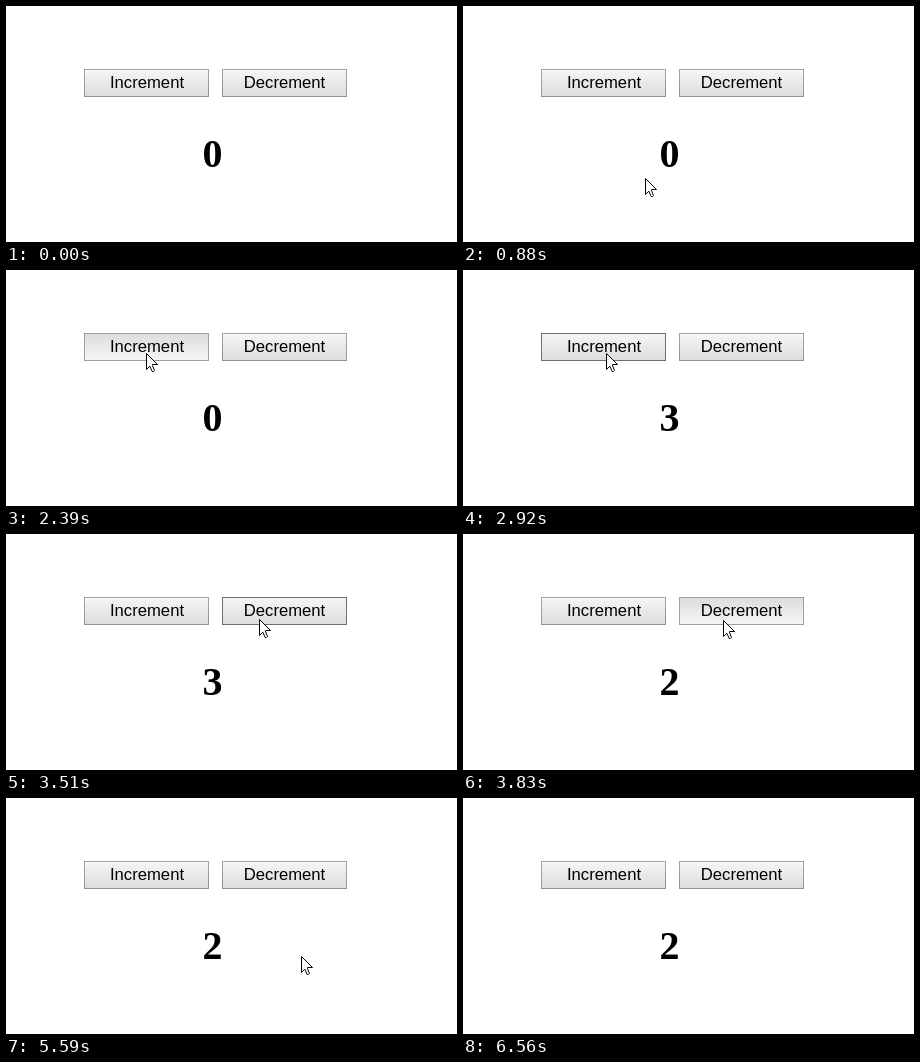
An HTML page for the animation above (6.86 s loop, 451 px wide and 236 px high).

```html
<!DOCTYPE html>
<html lang="en">
<head>
<meta charset="utf-8">
<title>Counter</title>
<style>
  html, body { margin: 0; width: 100%; height: 100%; overflow: hidden; background: #fff; }
  svg { display: block; }
  .button rect { fill: url(#raised); stroke: url(#edge); }
  .button.hover rect { stroke: #707070; }
  .button.pressed rect { fill: url(#sunken); stroke: #a0a0a0; }
  .button text { font: 16.667px "Liberation Sans", Arial, sans-serif; text-anchor: middle; }
  #count { font: bold 40px "Liberation Serif", "Times New Roman", serif; text-anchor: middle; }
</style>
</head>
<body>
<svg width="451" height="236" viewBox="0 0 451 236">
  <defs>
    <linearGradient id="raised" x2="0" y2="1">
      <stop stop-color="#f6f6f6"/><stop offset="1" stop-color="#dcdcdc"/>
    </linearGradient>
    <linearGradient id="sunken" x2="0" y2="1">
      <stop stop-color="#dcdcdc"/><stop offset="1" stop-color="#f6f6f6"/>
    </linearGradient>
    <linearGradient id="edge" x2="0" y2="1">
      <stop stop-color="#a4a4a4"/><stop offset="1" stop-color="#929292"/>
    </linearGradient>
  </defs>
  <g class="button" transform="translate(78 63)">
    <rect x=".5" y=".5" width="124" height="27"/>
    <text x="63" y="19">Increment</text>
  </g>
  <g class="button" transform="translate(216 63)">
    <rect x=".5" y=".5" width="124" height="27"/>
    <text x="62.5" y="19">Decrement</text>
  </g>
  <text id="count" x="206.5" y="161">0</text>
  <path id="cursor" d="M.5.5V16.5L3.8 13.2 6.2 18.5H7.5L8.5 17.5 6.5 12.5V11.5H11.5Z"
    fill="#fff" stroke="#000" stroke-linejoin="round"/>
</svg>
<script>
const LOOP = 6860;
const CLICK = 120; // one click; the button is down for its first half

// Key points of the pointer's route, joined by straight glides
const route = [
  { t: 330, x: 288, y: 240 },
  { t: 1040, x: 152, y: 152 },
  { t: 1630, x: 136, y: 95 },
  { t: 1960, x: 138, y: 83 },
  { t: 2920, x: 143, y: 83 },
  { t: 3540, x: 258, y: 85 },
  { t: 3690, x: 260, y: 86 },
  { t: 4180, x: 260, y: 86 },
  { t: 4450, x: 140, y: 86 },
  { t: 4700, x: 140, y: 86 },
  { t: 5590, x: 295, y: 158 },
  { t: 6270, x: 381, y: 219 },
  { t: 6560, x: 390, y: 236 }
];

const bursts = [
  { start: 2350, clicks: 3, change: 1 },
  { start: 3705, clicks: 2, change: -1 },
  { start: 4510, clicks: 1, change: 1 }
];

const buttons = document.querySelectorAll(".button");
const cursor = document.getElementById("cursor");
const count = document.getElementById("count");
const clamp = (value, low, high) => Math.min(high, Math.max(low, value));

function pointerAt(t) {
  const next = clamp(route.findIndex(p => p.t > t), 0, route.length);
  if (t >= route.at(-1).t) return route.at(-1);
  const b = route[next], a = route[next - 1] || b;
  const k = a === b ? 0 : (t - a.t) / (b.t - a.t);
  const mix = axis => Math.round(a[axis] + (b[axis] - a[axis]) * k);
  return { x: mix("x"), y: mix("y") };
}

function isDown(t) {
  return bursts.some(({ start, clicks }) =>
    t >= start && t < start + clicks * CLICK && (t - start) % CLICK < CLICK / 2);
}

function countAt(t) {
  return bursts.reduce((sum, { start, clicks, change }) =>
    sum + change * clamp(Math.floor((t - start) / CLICK + 0.5), 0, clicks), 0);
}

function draw() {
  const t = performance.now() % LOOP;
  const { x, y } = pointerAt(t);
  cursor.setAttribute("transform", `translate(${x} ${y})`);
  buttons.forEach((button, i) => {
    const left = 78 + 138 * i;
    const hover = x >= left && x < left + 125 && y >= 63 && y < 91;
    button.classList.toggle("hover", hover);
    button.classList.toggle("pressed", hover && isDown(t));
  });
  count.textContent = countAt(t);
  requestAnimationFrame(draw);
}

draw();
</script>
</body>
</html>
```
